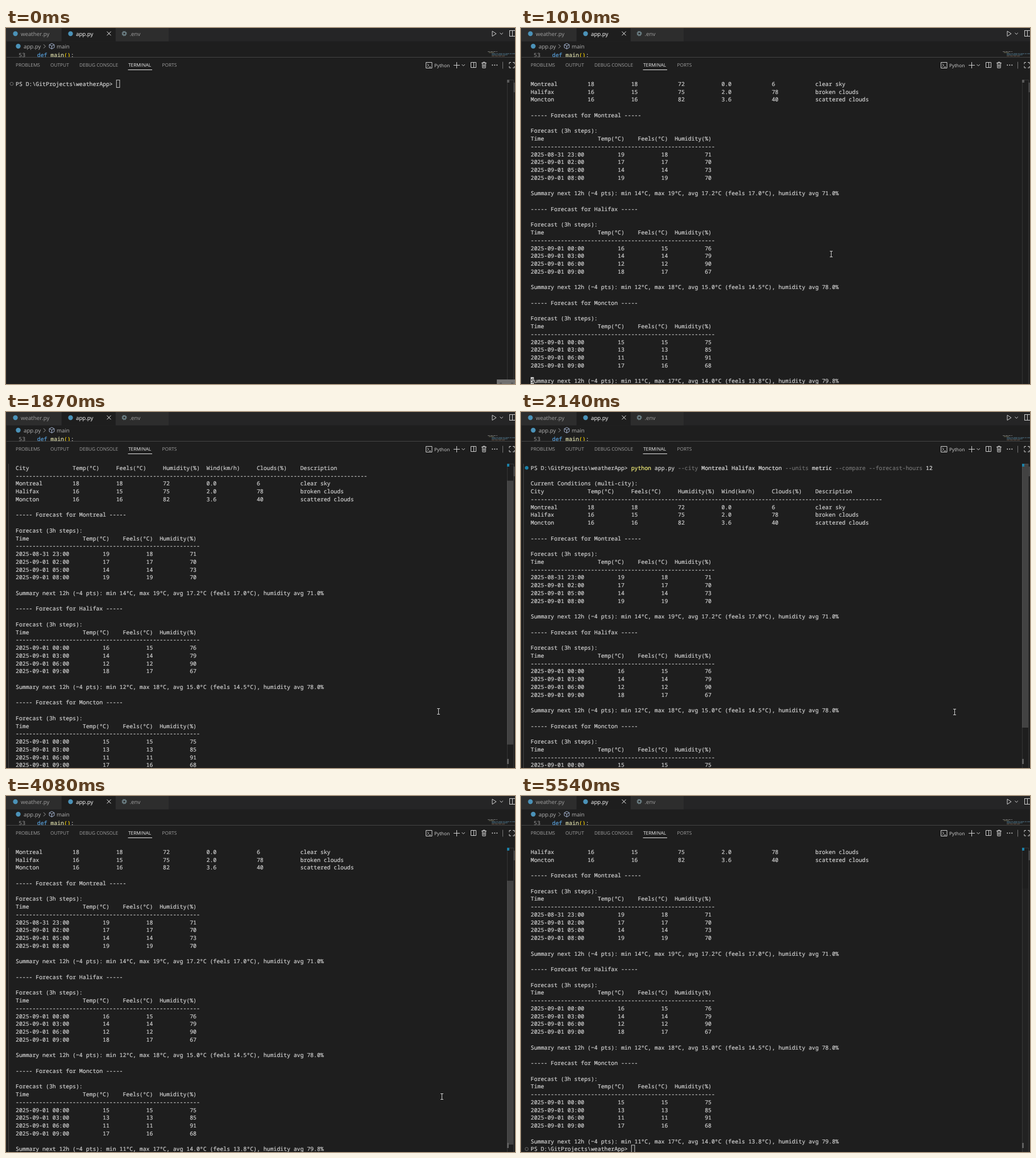
Animation, 895 px wide and 626 px high, one loop 5.61 s. Source, as an HTML page:

```html
<!DOCTYPE html>
<html lang="en">
<head>
<meta charset="utf-8">
<title>Weather forecast in a terminal</title>
<style>
  html, body { margin: 0; width: 100%; height: 100%; overflow: hidden; background: #1e1e1e; }
  svg { display: block; width: 895px; height: 626px; }
  text { white-space: pre; text-rendering: geometricPrecision; color: #d2d2d2; }
  text, tspan { fill: currentColor; }
  .ui { font-family: "Open Sans", "Noto Sans", sans-serif; font-size: 9.7px; }
  .panel { font-size: 8.3px; }
  .mono { font-family: "Noto Sans Mono", "DejaVu Sans Mono", monospace; font-size: 9.82px; }
  .mono text, .mono tspan { stroke: currentColor; stroke-width: .2px; }
  .dim { color: #a0a0a0; }
  .icon { fill: none; stroke: #d0d0d0; stroke-width: 1; }
</style>
</head>
<body>
<svg viewBox="0 0 895 626">
  <defs>
    <clipPath id="editorClip"><rect y="38" width="895" height="13"/></clipPath>
    <clipPath id="termClip"><rect y="91" width="895" height="535"/></clipPath>
  </defs>
  <rect width="895" height="626" fill="#1e1e1e"/>

  <!-- tabs -->
  <rect width="895" height="23.5" fill="#252526"/>
  <rect width="97.5" height="23.5" fill="#2d2d2d"/>
  <rect x="98" width="94.5" height="23.5" fill="#1e1e1e"/>
  <rect x="193" width="93" height="23.5" fill="#2d2d2d"/>
  <g fill="#4b92b8">
    <circle cx="16.5" cy="10" r="4.2"/>
    <circle cx="113.5" cy="10" r="4.2"/>
    <circle cx="21.5" cy="32" r="4.2"/>
  </g>
  <circle cx="208" cy="9.8" r="2.7" fill="none" stroke="#6d8086" stroke-width="2"/>
  <circle cx="208" cy="9.8" r="4" fill="none" stroke="#6d8086" stroke-width="1.2" stroke-dasharray="1.57 1.57"/>
  <g class="ui">
    <text class="dim" x="26" y="13.6">weather.py</text>
    <text x="123" y="13.6" style="color:#fff">app.py</text>
    <text class="dim" x="217.5" y="13.6">.env</text>
    <text x="31" y="35.8" style="color:#b0b0b0">app.py</text>
    <text x="89" y="35.8" style="color:#b0b0b0">main</text>
  </g>
  <g class="icon">
    <path d="M177.5 6.2l7 7m0-7l-7 7" stroke="#eee"/>
    <path d="M66 28.8l3.4 3.4-3.4 3.4" stroke="#a0a0a0"/>
    <path d="M80.5 27.2l4.4 2.2v5l-4.4 2.4-4.4-2.4v-5zM76.1 29.4l4.4 2.3 4.4-2.3M80.5 31.7v5" stroke="#a5b4d0"/>
    <path d="M855 5.5v9l7-4.5zM868.5 8.5l2.7 2.7 2.7-2.7"/>
    <path d="M885 4.5h10M885 14.5h10M885.5 4.5v10M890.5 4.5v10"/>
  </g>

  <!-- editor strip -->
  <g class="mono" clip-path="url(#editorClip)">
    <text x="22.3" y="51.3" style="color:#858585">53</text>
    <text x="54.8" y="51.3"><tspan color="#569cd6">def</tspan> <tspan color="#dcdcaa">main</tspan><tspan color="#ffd700">()</tspan>:</text>
  </g>
  <g stroke-width="1" fill="none" opacity=".75">
    <path d="M847 41.5h17" stroke="#8a8a8a" stroke-dasharray="4 1"/>
    <path d="M849 43.2h9" stroke="#8a8a6a"/>
    <path d="M854 45.2h41" stroke="#5f8ca5" stroke-dasharray="7 1 3 1"/>
    <path d="M854 47.2h28" stroke="#4f7f96" stroke-dasharray="9 1"/>
    <path d="M854 49.2h24" stroke="#8a6f5c" stroke-dasharray="5 1"/>
  </g>
  <path d="M0 51.5h895" stroke="#444"/>

  <!-- panel header -->
  <g class="ui panel">
    <text class="dim" x="17" y="68.2">PROBLEMS</text>
    <text class="dim" x="78" y="68.2">OUTPUT</text>
    <text class="dim" x="129" y="68.2">DEBUG CONSOLE</text>
    <text x="215" y="68.2" style="color:#eee">TERMINAL</text>
    <text class="dim" x="274.5" y="68.2">PORTS</text>
    <text x="753" y="68.6">Python</text>
  </g>
  <path d="M214.5 73.5h42.5" stroke="#e7e7e7"/>
  <g class="icon">
    <path d="M738.5 60.5h10.5v10h-10.5zM740.8 63l2.6 2.5-2.6 2.5M744 68.5h3"/>
    <path d="M787 65.5h11M792.5 60v11M801.5 64l2.7 2.7 2.7-2.7"/>
    <path d="M817.5 60.5h9v9h-9zM822.5 60.5v9"/>
    <path d="M836 61.5h9M838.8 61.5v-1.5h3.4v1.5M837.5 62l.4 8.2h5.2l.4-8.2M839.5 63.5v5M841.5 63.5v5"/>
    <path d="M873.5 59.5v12" stroke="#777"/>
    <path d="M885 63.5v-3h3M891 60.5h3v3M894 67v3h-3M888 70h-3v-3"/>
  </g>
  <g fill="#d0d0d0">
    <circle cx="855.3" cy="65.3" r="1"/><circle cx="859.3" cy="65.3" r="1"/><circle cx="863.3" cy="65.3" r="1"/>
  </g>

  <!-- terminal -->
  <path d="M.5 24v602" stroke="#292929"/>
  <g clip-path="url(#termClip)">
    <path id="guide" d="M4.5 91v535" stroke="#454545"/>
    <g id="buffer" class="mono"></g>
  </g>
  <path d="M881.5 91v535M892.5 91v535M881 91.5h11" stroke="#353535" fill="none"/>
  <rect id="slider" x="881" y="91" width="11" height="464" fill="#797979"/>
  <rect id="topMark" x="881" y="91" width="4" height="5"/>
  <rect id="endMark" x="881" y="610" width="3" height="9" fill="#606060"/>
  <rect x="892" y="96" width="3" height="17" fill="#434343"/>
  <g id="corner">
    <rect x="863" y="618" width="32" height="8" fill="#707070"/>
    <path d="M868 624.5h4M888 624.5h4" stroke="#3c3c3c"/>
  </g>
  <path id="mouse" fill="none" stroke="#d0d0d0" d="M-2.5 -5h5M0 -5v10M-2.5 5h5"/>
</svg>

<script>
const LOOP = 5610, ROW = 13.75, COL = 5.892, LEFT = 17, TOP = 91.4;
const SVG = 'http://www.w3.org/2000/svg';
const $ = id => document.getElementById(id);
const show = (el, on) => el.setAttribute('visibility', on ? 'visible' : 'hidden');

function add(parent, tag, attrs, text = '') {
  const el = document.createElementNS(SVG, tag);
  for (const k in attrs) el.setAttribute(k, attrs[k]);
  el.textContent = text;
  return parent.appendChild(el);
}

// Lays out cells at text columns; a negative column marks a right-aligned end.
function cells(cols, values) {
  return values.reduce((line, v, i) => {
    const at = cols[i] < 0 ? -cols[i] - v.length : cols[i];
    return line.padEnd(at) + v;
  }, '');
}

const PROMPT = 'PS D:\\GitProjects\\weatherApp> ';
const CITY_COLS = [0, 17, 30, 44, 57, 72, 85];
const HOUR_COLS = [0, -28, -41, -54];
const city = line => cells(CITY_COLS, line.split('|'));
const hour = line => cells(HOUR_COLS, line.split('|'));

function forecast(name, rows, [min, max, avg, feels, hum]) {
  return ['', `----- Forecast for ${name} -----`, '', 'Forecast (3h steps):',
    hour('Time|Temp(ºC)|Feels(ºC)|Humidity(%)'), '-'.repeat(55),
    ...rows.map(r => hour('2025-' + r)), '',
    `Summary next 12h (~4 pts): min ${min}ºC, max ${max}ºC, avg ${avg}ºC (feels ${feels}ºC), humidity avg ${hum}%`];
}

const lines = [
  PROMPT, '', 'Current Conditions (multi-city):',
  city('City|Temp(ºC)|Feels(ºC)|Humidity(%)|Wind(km/h)|Clouds(%)|Description'),
  '-'.repeat(105),
  city('Montreal|18|18|72|0.0|6|clear sky'),
  city('Halifax|16|15|75|2.0|78|broken clouds'),
  city('Moncton|16|16|82|3.6|40|scattered clouds'),
  ...forecast('Montreal',
    ['08-31 23:00|19|18|71', '09-01 02:00|17|17|70', '09-01 05:00|14|14|73', '09-01 08:00|19|19|70'],
    ['14', '19', '17.2', '17.0', '71.0']),
  ...forecast('Halifax',
    ['09-01 00:00|16|15|76', '09-01 03:00|14|14|79', '09-01 06:00|12|12|90', '09-01 09:00|18|17|67'],
    ['12', '18', '15.0', '14.5', '78.0']),
  ...forecast('Moncton',
    ['09-01 00:00|15|15|75', '09-01 03:00|13|13|85', '09-01 06:00|11|11|91', '09-01 09:00|17|16|68'],
    ['11', '17', '14.0', '13.8', '79.8']),
  PROMPT
];

const buffer = $('buffer');
const baseline = row => TOP + row * ROW + 10.5;
const block = add(buffer, 'rect', { width: 5.6, height: 13.2 });
const rows = lines.map((s, i) => add(buffer, 'text', { x: LEFT, y: baseline(i) }, s));
const under = add(buffer, 'text', { style: 'color:#1e1e1e' });

const command = add(rows[0], 'tspan', {});
const part = (s, color) => add(command, 'tspan', { color }, s);
part('python', '#f5f07a');
part(' app.py', '#d2d2d2');
part(' --city', '#737373');
part(' Montreal Halifax Moncton', '#e5e5e5');
part(' --units', '#737373');
part(' metric', '#e5e5e5');
part(' --compare --forecast-hours', '#737373');
part(' 12', '#e5e5e5');

const ring = { cx: 10, r: 2.8, fill: 'none', stroke: '#6e6e6e' };
const dots = [0, 44].map(r => add(buffer, 'circle', { ...ring, cy: TOP + r * ROW + 6.8 }));

// time, printed lines, cursor row, cursor column
const output = [
  [0, 1, 0, 30], [340, 1, 0, 120], [470, 8, 8, 0], [620, 20, 20, 0],
  [880, 32, 32, 0], [1010, 44, 43, 0], [1070, 45, 44, 30]
];
// time, scroll position in lines
const scrolls = [
  [0, 0], [1010, 5], [1070, 6], [1200, 5.4], [1270, 3.7], [1340, 3],
  [1870, 2.5], [1940, 1.3], [2070, .4], [2140, 0], [4080, 4.87], [4130, 6]
];
// time, slider opacity
const fades = [[0, 0], [1200, .4], [5470, .2], [5540, .04]];
// time, pointer position
const OFF = -50;
const pointer = [
  [0, OFF, OFF], [1010, 545, 397], [1070, 650, 460], [1200, 757, 524], [1270, 759, 525],
  [1870, 760, 526], [2140, 762, 527], [2270, 763, 527]
];
[2670, 2740, 2880, 2950, 3080].forEach((t, i) => pointer.push([t, 764 + i / 2, 527.5 + i / 4]));
for (let i = 0; i < 8; i++) pointer.push([4460 + i * 67.5, 775 + i * 9, 538 + i * 11.9]);
pointer.push([5000, OFF, OFF]);

const at = (table, t) => table.findLast(step => step[0] <= t);
const pixel = v => Math.floor(v) + .5;

function draw(t) {
  const [, count, row, col] = at(output, t);
  const scroll = at(scrolls, t)[1];
  const [, mx, my] = at(pointer, t);
  const done = t >= 1070;

  rows.forEach((el, i) => show(el, i < count));
  command.style.display = t < 340 ? 'none' : '';
  buffer.setAttribute('transform', `translate(0 ${-Math.round(scroll) * ROW})`);

  const hollow = t < 70 || t >= 5470;
  const x = LEFT + col * COL, y = TOP + row * ROW;
  block.setAttribute('x', hollow ? x + .5 : x);
  block.setAttribute('y', y);
  block.setAttribute('fill', hollow ? 'none' : '#ccc');
  block.setAttribute('stroke', hollow ? '#ccc' : 'none');
  under.setAttribute('x', x);
  under.setAttribute('y', baseline(row));
  under.textContent = row < count ? lines[row][col] || '' : '';

  dots[0].setAttribute('fill', done ? '#1b81a8' : 'none');
  dots[0].setAttribute('stroke', done ? '#1b81a8' : '#6e6e6e');
  show(dots[1], done);
  $('topMark').setAttribute('fill', done ? '#1b81a8' : '#5a5a5a');
  show($('endMark'), done);

  $('slider').setAttribute('y', 91 + scroll * 11.9);
  $('slider').setAttribute('opacity', at(fades, t)[1]);
  show($('guide'), done && my > 0 && my < 614);
  show($('corner'), t < 70);
  $('mouse').setAttribute('transform', `translate(${pixel(mx)} ${pixel(my)})`);
}

const start = performance.now();
function tick() {
  draw((performance.now() - start) % LOOP);
  requestAnimationFrame(tick);
}
tick();
</script>
</body>
</html>
```
